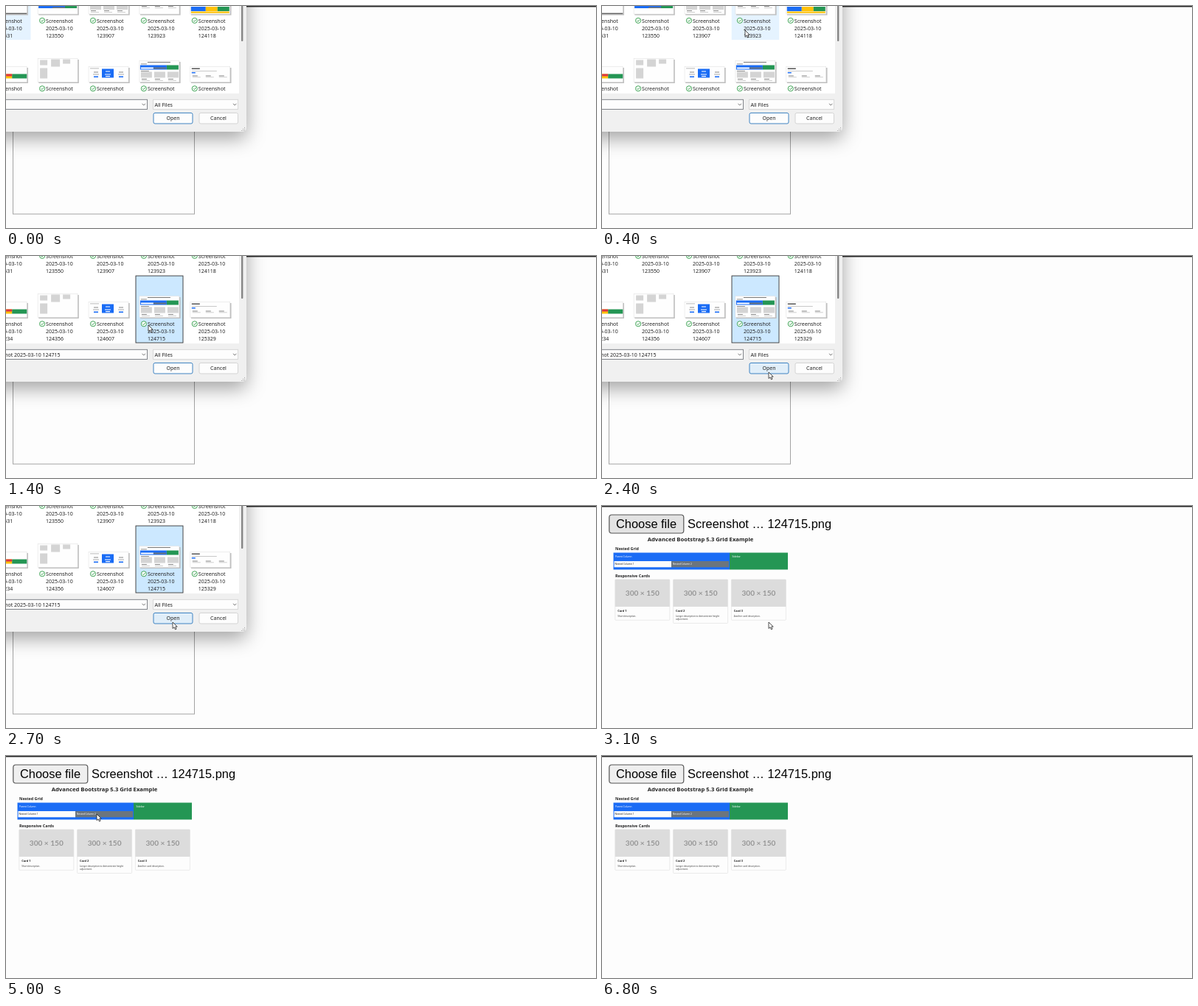
Animation of 800 by 302 pixels, one loop 6.9 s. Source, as an HTML page:

```html
<!DOCTYPE html>
<html lang="en">
<head>
<meta charset="utf-8">
<title>Choosing a file</title>
<style>
  html, body { margin: 0; width: 100%; height: 100%; overflow: hidden; background: #fdfdfd; }
  svg { display: block; width: 800px; height: 302px; }
  text { font-family: "Noto Sans", "Open Sans", sans-serif; white-space: pre; }
  .page { font-family: "Liberation Sans", Arial, sans-serif; font-size: 16.4px; }
  .size { font-family: Lato, sans-serif; }
  #shadow { filter: drop-shadow(0 9px 13px rgba(0, 0, 0, .36)); }
</style>
</head>
<body>
<svg viewBox="0 0 800 302">
  <clipPath id="listClip"><rect width="316" height="119"/></clipPath>
  <rect width="800" height="302" fill="#fdfdfd"/>
  <rect width="800" height="1.4" fill="#222"/>
  <g id="page">
    <rect id="choose" x="9.8" y="12" width="101" height="25" rx="3.5" stroke="#555" stroke-width="1.2"/>
    <text class="page" x="19" y="30">Choose file</text>
    <text class="page" id="fileName" x="116" y="30"></text>
  </g>
  <rect id="emptyBox" x="9.5" y="41.5" width="246" height="241.5" fill="none" stroke="#a3a3a3"/>
  <g id="preview"></g>
  <g id="dialog">
    <path id="shadow" d="M-40-40H326V165Q326 171 320 171H-40Z" fill="#f0f0f0"/>
    <rect width="316" height="119" fill="#fff"/>
    <g clip-path="url(#listClip)"><g id="list">
      <rect id="hover" width="64.5" height="91" fill="#e5f3ff"/>
      <rect id="selected" x="176" y="47" width="64" height="91" fill="#cce8ff" stroke="#333" stroke-width=".9"/>
    </g></g>
    <rect id="thumb" x="319" y="-5" width="2.4" rx="1" fill="#868686"/>
    <g id="footer"></g>
  </g>
  <path id="cursor" d="M0 0V8.6L2 6.8 3.5 10 5 9.3 3.6 6.2H6.2Z" fill="#fff" stroke="#222" stroke-width=".8"/>
</svg>
<script>
const $ = id => document.getElementById(id);

function add(parent, tag, attrs, label) {
  const el = document.createElementNS("http://www.w3.org/2000/svg", tag);
  for (const key in attrs) el.setAttribute(key, attrs[key]);
  if (label) el.textContent = label;
  parent.append(el);
  return el;
}
const rect = (g, x, y, width, height, fill, more) => add(g, "rect", { x, y, width, height, fill, ...more });
const text = (g, x, y, size, label, more) => add(g, "text", { x, y, "font-size": size, fill: "#222", ...more }, label);
const line = (g, d, stroke, width = 1) => add(g, "path", { d, stroke, fill: "none", "stroke-width": width });
const show = (id, on) => $(id).setAttribute("display", on ? "inline" : "none");
const move = (id, x, y) => $(id).setAttribute("transform", `translate(${x} ${y})`);

const BLUE = "#1a6cf5", GREEN = "#249654", GREY = "#6c757d", PALE = "#d4d4d4", YELLOW = "#ffc107";
const middle = { "text-anchor": "middle" };

// Picture that appears once the file is opened
function buildPreview() {
  const g = $("preview"), bold = { "font-weight": 600 }, white = { fill: "#fff" };
  text(g, 133.5, 48, 7.7, "Advanced Bootstrap 5.3 Grid Example", { ...bold, ...middle });
  text(g, 18, 60.2, 5.4, "Nested Grid", bold);
  rect(g, 15.5, 63.5, 157.5, 23, BLUE);
  rect(g, 173, 63.5, 79, 23, GREEN);
  rect(g, 16.5, 75, 77.5, 8.3, "#fbfbfb");
  rect(g, 94, 75, 78, 8.3, GREY);
  text(g, 18, 70.3, 3.2, "Parent Column", white);
  text(g, 176.5, 70.3, 3.2, "Sidebar", white);
  text(g, 17.5, 80.3, 3.2, "Nested Column 1");
  text(g, 96, 80.3, 3.2, "Nested Column 2", white);
  text(g, 18, 97.2, 5.4, "Responsive Cards", bold);
  const notes = [
    ["Short description."],
    ["Longer description to demonstrate height", "adjustment."],
    ["Another card description."]
  ];
  notes.forEach((rows, i) => {
    const x = 17.8 + i * 78.8;
    rect(g, x, 100, 74, rows.length > 1 ? 59.5 : 55.3, "#fdfdfd", { stroke: "#dedede", "stroke-width": .6, rx: 1 });
    rect(g, x, 100, 74, 37, "#dcdcdc");
    text(g, x + 37, 122, 10.1, "300 × 150", { ...middle, class: "size", "font-weight": 700, fill: "#969696" });
    text(g, x + 3.4, 144.2, 3.9, "Card " + (i + 1), bold);
    rows.forEach((row, j) => text(g, x + 3.4, 150.6 + j * 4.8, 3, row, { fill: "#444" }));
  });
}

// Small pictures; bars are [x, y, width, height, colour] from the left and bottom edge
const cards = (y, h) => [2, 20, 38].map(x => [x, y, 15, h, PALE]);
const lines = y => [3, 21, 39].flatMap(x => [[x, y, 7, 1, "#888"], [x, y + 2, 11, .7, "#bbb"]]);
const thumbs = [
  [[31, [[0, -1.4, 54, 1.2, "#444"]]],
   [31, [[1, -12, 37, 4, BLUE], [37, -12, 16, 4, GREEN], [20, -9.5, 17, 1.5, GREY]]],
   [31, [...cards(-16, 10), ...lines(-5)]],
   [31, [...lines(-11)]],
   [31, [[1, -14, 52, 3, GREEN], [1, -10, 20, 6, BLUE], [21, -10, 16, 6, YELLOW], [37, -10, 16, 6, GREEN],
         [1, -3.5, 52, 2.2, YELLOW]]]],
  [[21, [[0, -11, 34, 6, YELLOW], [34, -11, 20, 6, GREEN], [26, -11, 8, 3, "#dc3545"]]],
   [32, [[3, -30, 10, 7, PALE], [18, -31, 12, 10, PALE], [34, -31, 10, 6, PALE], [3, -19, 10, 14, PALE]]],
   [21, [[18, -18, 16, 12, BLUE], [23, -15, 6, 1, "#fff"], [22, -11, 8, 1, "#fff"], [23, -8.5, 6, 1.2, "#fff"],
         [2, -19, 12, .8, "#aaa"], [7, -14, 6, 1, "#888"], [6, -11, 8, 1, "#aaa"], [7, -8, 6, 1.6, BLUE],
         [41, -14, 6, 1, "#888"], [40, -11, 8, 1, "#aaa"], [41, -8, 6, 1.6, BLUE]]],
   [29, [[11, -27.5, 31, 1, "#777"], [2, -25, 8, .8, "#777"], [1, -23, 36, 6, BLUE], [37, -23, 16, 6, GREEN],
         [2, -20, 17, 2, "#fff"], [19, -20, 17, 2, GREY], [2, -15.5, 11, .8, "#777"], ...cards(-14, 8), ...lines(-4.5)]],
   [21, [[2, -19, 11, 1.5, "#555"], [2, -15.5, 34, .8, "#bbb"], [2, -13.5, 5, 1.5, BLUE], ...lines(-9)]]]
];
const times = [
  [123531, 123550, 123907, 123923, 124118],
  [124234, 124356, 124607, 124715, 125329]
];
const centre = col => 1.2 + col * 68.9;

function buildList() {
  const g = $("list");
  thumbs.forEach((row, r) => row.forEach(([height, bars], c) => {
    const x = centre(c) - 27, bottom = 11 + r * 92.5, label = bottom + 11.6;
    rect(g, x + 1.2, bottom - height + 1.5, 54.5, height, "#bdbdbd");
    rect(g, x, bottom - height, 54, height, "#fefefe", { stroke: "#ddd", "stroke-width": .5 });
    for (const [dx, dy, w, h, fill] of bars) rect(g, x + dx, bottom + dy, w, h, fill);
    add(g, "circle", { cx: x + 6, cy: label - 2.8, r: 3.6, fill: "#fff", stroke: "#2c9b45", "stroke-width": .9 });
    line(g, `M${x + 4.3} ${label - 2.8}l1.3 1.4 2.5-2.7`, "#2c9b45", .9);
    ["Screenshot", "2025-03-10", times[r][c]].forEach((s, i) =>
      text(g, x + 11, label + i * 10, 7, String(s)));
  }));
}

function buildFooter() {
  const g = $("footer");
  const box = (x, y, w, h, stroke, rx) => rect(g, x, y, w, h, "#fdfdfd", { stroke, rx, "stroke-width": .9 });
  box(-10, 127.3, 201.5, 13.2, "#74797f", 0);
  box(199.5, 127.3, 115, 13.2, "#d5d5d5", 0);
  for (const x of [184.5, 308]) line(g, `M${x} 132.8l2.2 2.3 2.2-2.3`, "#555", .8);
  text(g, 201.5, 136.6, 7, "All Files");
  text(g, 73.5, 136.6, 7, "Screenshot 2025-03-10 124715", { "text-anchor": "end", id: "nameField" });
  box(200, 145.5, 53, 14.5, "#2b78bd", 2).id = "open";
  box(262, 145.5, 52.5, 14.5, "#d0d0d0", 2);
  text(g, 226.5, 155.4, 7, "Open", middle);
  text(g, 288, 155.4, 7, "Cancel", middle);
  for (let i = 0; i < 3; i++)
    for (let j = 0; j <= i; j++) rect(g, 323 - j * 2, 165 + i * 2, 1, 1, "#aaa");
}

// Cursor stops: [time, x, y]
const path = [
  [0, -14, 20], [100, -14, 20], [400, 194, 33], [600, 194, 36], [1000, 193, 94], [1500, 193, 94],
  [2000, 226, 158], [4400, 226, 158], [4900, 123, 79], [5100, 123, 79],
  [5600, 212, 171], [5800, 212, 171], [6200, 240, 160]
];
const ease = p => p * p * (3 - 2 * p);
const ramp = (t, from, to) => ease(Math.min(1, Math.max(0, (t - from) / (to - from))));

function cursorAt(t) {
  let [, x, y] = path[0];
  for (let i = 1; i < path.length; i++) {
    const p = ramp(t, path[i - 1][0], path[i][0]);
    x += (path[i][1] - path[i - 1][1]) * p;
    y += (path[i][2] - path[i - 1][2]) * p;
  }
  return [x, y];
}

function draw(t) {
  const [x, y] = cursorAt(t), scroll = 20 * ramp(t, 800, 1100);
  const opened = t >= 3000;
  move("cursor", x, y);
  show("cursor", t < 6300);

  show("dialog", t < 2800);
  move("list", 0, -scroll);
  $("thumb").setAttribute("height", 53 + scroll / 2);
  const col = Math.round((x - centre(0)) / 68.9), row = y + scroll > 46.5 ? 1 : 0;
  move("hover", centre(col) - 32.2, -45 + row * 92);
  show("hover", y < 119);
  show("selected", t >= 1200);
  show("nameField", t >= 1200);
  const overOpen = x > 200 && x < 253 && y > 145 && y < 160;
  $("open").setAttribute("fill", overOpen ? "#e0eef9" : "#fdfdfd");

  show("emptyBox", !opened);
  show("preview", opened);
  $("fileName").textContent = opened ? "Screenshot … 124715.png" : "No file chosen";
  $("choose").setAttribute("fill", t < 4500 ? "#e3e3e3" : "#efefef");
}

buildPreview();
buildList();
buildFooter();

const start = performance.now();
function tick() {
  const t = (performance.now() - start) % 6900;
  draw(Math.floor(t / 100) * 100);
  requestAnimationFrame(tick);
}
tick();
</script>
</body>
</html>
```
